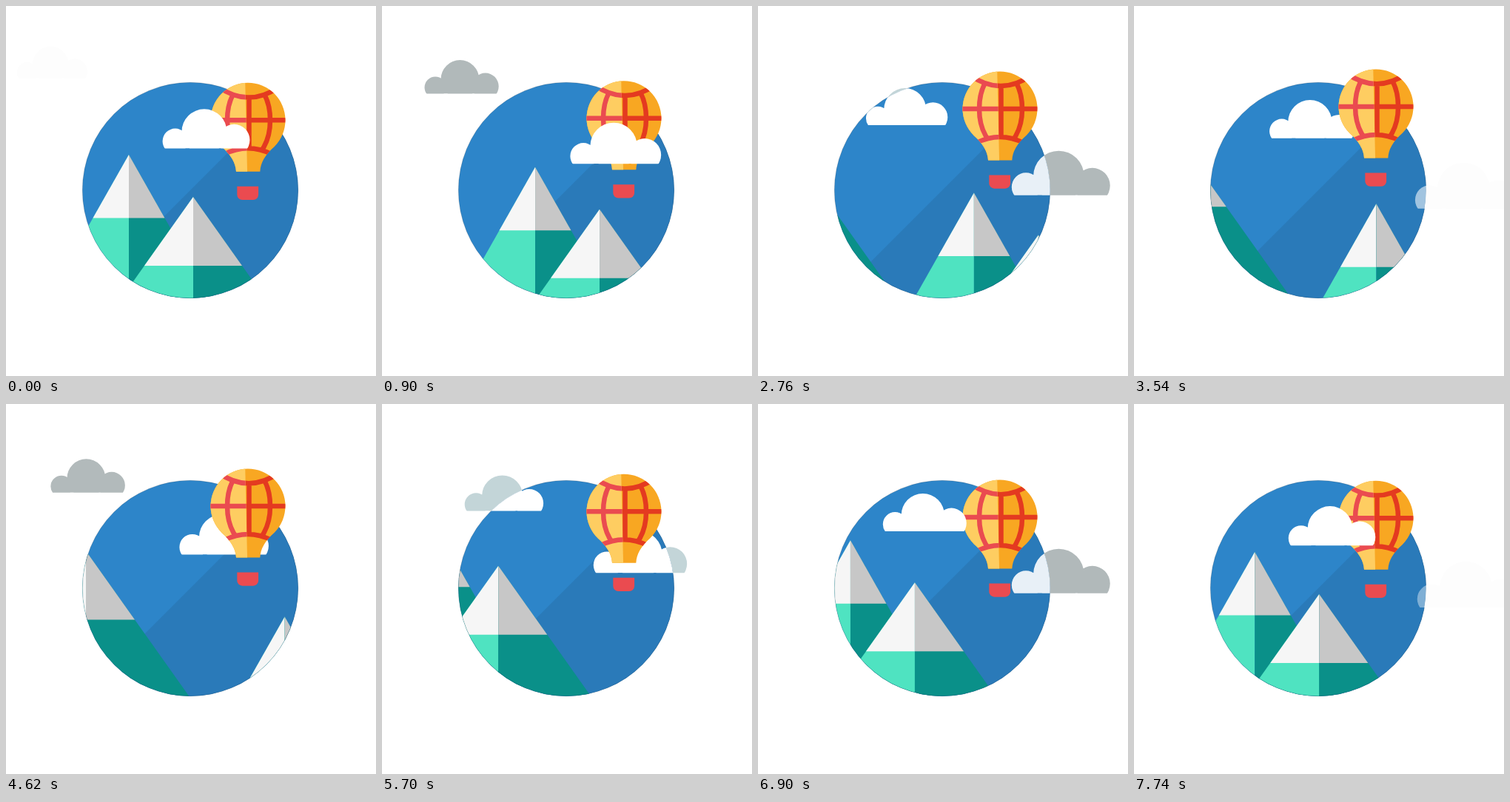
These frames come from a looping animation (500 by 500 pixels, 7800 ms). An HTML page with a canvas:

```html
<!DOCTYPE html>
<html lang="en">
<head>
<meta charset="utf-8">
<title>Balloon over the mountains</title>
<style>
  html, body { margin: 0; width: 100%; height: 100%; overflow: hidden; background: #fff; }
  canvas { display: block; width: 500px; height: 500px; }
</style>
</head>
<body>
<canvas id="stage" width="500" height="500"></canvas>
<script>
const ctx = document.getElementById('stage').getContext('2d');
const LOOP = 7800, STEP = 60, TAU = Math.PI * 2;
const DISC = { x: 249, y: 249, r: 145.7 };

// Piecewise linear ramp over [position, value] stops.
function ramp(stops, p) {
  if (p <= stops[0][0]) return stops[0][1];
  for (let i = 1; i < stops.length; i++) {
    const [p0, v0] = stops[i - 1], [p1, v1] = stops[i];
    if (p <= p1) return v0 + (v1 - v0) * (p - p0) / (p1 - p0);
  }
  return stops[stops.length - 1][1];
}

function poly(color, ...pts) {
  ctx.fillStyle = color;
  ctx.beginPath();
  pts.forEach(([x, y]) => ctx.lineTo(x, y));
  ctx.closePath();
  ctx.fill();
}

function rect(color, x, y, w, h) {
  ctx.fillStyle = color;
  ctx.fillRect(x, y, w, h);
}

function discPath() {
  ctx.beginPath();
  ctx.arc(DISC.x, DISC.y, DISC.r, 0, TAU);
}

function scoped(draw) {
  ctx.save();
  draw();
  ctx.restore();
}

// One peak: snow cap of height cap, sides running down past the disc.
function mountain(x, y, slope, cap) {
  const h = 420, line = y + cap, foot = y + h;
  const side = (dir, snow, grass) => {
    poly(grass, [x, y], [x + dir * slope * h, foot], [x, foot]);
    poly(snow, [x, y], [x + dir * slope * cap, line], [x, line]);
  };
  side(-1, '#f6f6f6', '#4fe3c1');
  side(1, '#c7c7c7', '#0a9089');
}

function mountains(t) {
  for (const time of [t, t - LOOP]) {
    const x = 166 + time * 0.0456, y = 201 + time * 0.0187;
    mountain(x, y, 0.567, 85.5);
    mountain(x + 87, y + 57, 0.71, 93);
  }
}

function landscape(t) {
  scoped(() => {
    discPath();
    ctx.clip();
    rect('#2d85c9', 100, 100, 300, 300);
    poly('#2a7ab9', [98, 400], [400, 98], [400, 400]);
    mountains(t);
  });
  ctx.strokeStyle = 'rgba(20,45,65,0.35)';
  ctx.lineWidth = 0.6;
  discPath();
  ctx.stroke();
}

function balloonPath() {
  const a = Math.atan2(36, 35.5);
  ctx.beginPath();
  ctx.arc(0, 0, 50.5, Math.PI - a, TAU + a);
  ctx.quadraticCurveTo(17, 52, 16.3, 69.5);
  ctx.lineTo(-16, 69.5);
  ctx.quadraticCurveTo(-17, 52, -35.5, 36);
  ctx.closePath();
}

function bands() {
  ctx.lineWidth = 6.5;
  ctx.beginPath();
  ctx.moveTo(-52, 0);
  ctx.lineTo(52, 0);
  ctx.moveTo(1.5, -31);
  ctx.lineTo(1.5, 38);
  ctx.moveTo(-40, -45);
  ctx.quadraticCurveTo(1, -16.5, 42, -45);
  ctx.moveTo(-32, 46);
  ctx.quadraticCurveTo(0, 30, 32, 46);
  ctx.stroke();
  scoped(() => {
    ctx.beginPath();
    ctx.rect(-52, -34, 104, 75);
    ctx.clip();
    ctx.beginPath();
    ctx.ellipse(1, 0, 29, 51, 0, 0, TAU);
    ctx.stroke();
  });
}

function balloon(t) {
  const swing = Math.cos(TAU * Math.min(t, 7560) / 7560);
  scoped(() => {
    ctx.translate(327, 154.3 - 9.25 * (1 - swing));
    scoped(() => {
      balloonPath();
      ctx.clip();
      rect('#f8a722', -60, -60, 120, 140);
      ctx.strokeStyle = '#e43a20';
      bands();
      // Lit left half
      ctx.beginPath();
      ctx.moveTo(-60, -60);
      ctx.lineTo(-4, -60);
      ctx.lineTo(-0.7, 80);
      ctx.lineTo(-60, 80);
      ctx.clip();
      rect('#fecd61', -60, -60, 70, 140);
      ctx.strokeStyle = '#ea4b50';
      bands();
      ctx.fillStyle = '#e43a20';
      ctx.fillRect(-1.8, -31, 6.5, 69);
    });
    ctx.fillStyle = '#ea4b50';
    ctx.beginPath();
    ctx.roundRect(-14.7, 89.5, 28.8, 18.2, [0, 0, 7, 7]);
    ctx.fill();
  });
}

// Unit-wide cloud with its flat base on y = 0.
function cloudShape(x, y, w, color) {
  scoped(() => {
    ctx.translate(x, y);
    ctx.scale(w, w);
    ctx.beginPath();
    ctx.rect(-0.1, -0.6, 1.2, 0.6);
    ctx.clip();
    ctx.fillStyle = color;
    ctx.beginPath();
    for (const [cx, cy, r] of [[0.145, -0.084, 0.145], [0.478, -0.194, 0.258], [0.82, -0.098, 0.18]]) {
      ctx.moveTo(cx + r, cy);
      ctx.arc(cx, cy, r, 0, TAU);
    }
    ctx.rect(0.145, -0.12, 0.67, 0.12);
    ctx.fill();
  });
}

const FADE = [[0, 0.2], [60, 0.4], [120, 0.56], [420, 0.74], [900, 0.89], [1620, 0.98], [2040, 1]];
const TINT = [
  [[420, 166], [900, 177], [1620, 185], [2040, 195]],
  [[420, 171], [900, 185], [1620, 201], [2040, 213]],
  [[420, 172], [900, 186], [1620, 203], [2040, 216]]
];

function cloud(age) {
  const edge = Math.min(age, LOOP - age);
  const x = 14.7 + age * 0.04755, y = 97.8 + age * 0.0229, w = 95.3 + age * 0.00546;
  const tint = edge < 420 ? '#fdfdfd' : `rgb(${TINT.map(s => ramp(s, edge)).join()})`;
  scoped(() => {
    discPath();
    ctx.rect(0, 0, 500, 500);
    ctx.clip('evenodd');
    cloudShape(x, y, w, tint);
  });
  scoped(() => {
    discPath();
    ctx.clip();
    ctx.globalAlpha = ramp(FADE, edge);
    cloudShape(x, y, w, '#fff');
  });
}

function draw(t) {
  rect('#fff', 0, 0, 500, 500);
  landscape(t);
  cloud(t);
  balloon(t);
  cloud((t + LOOP - 3660) % LOOP);
}

const start = performance.now();
function tick() {
  const t = (performance.now() - start) % LOOP;
  draw(Math.floor(t / STEP) * STEP);
  requestAnimationFrame(tick);
}
tick();
</script>
</body>
</html>
```
